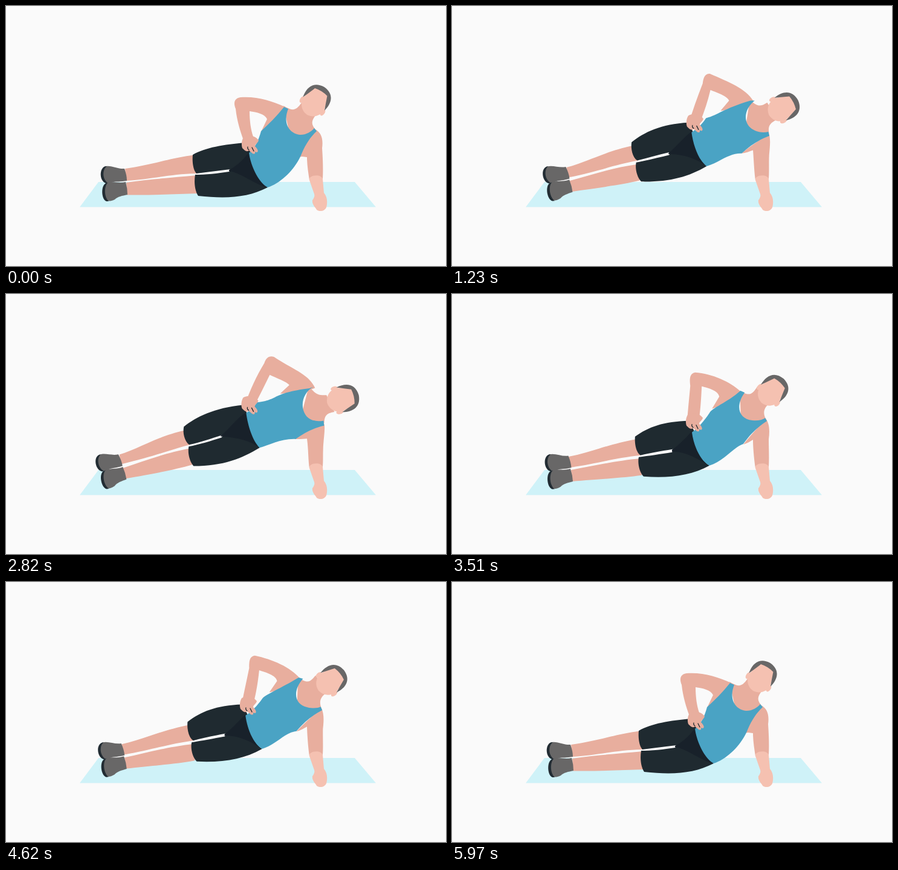
Animation, 728 px wide and 430 px high, one loop 6000 ms. Source, as an HTML page:

```html
<!DOCTYPE html>
<html lang="en">
<head>
<meta charset="utf-8">
<title>Side plank hip lift</title>
<style>
  html, body { margin: 0; width: 100%; height: 100%; overflow: hidden; background: #fafafa; }
  svg { display: block; width: 100vw; height: 100vh; }
</style>
</head>
<body>
<svg id="stage" viewBox="0 0 728 430" xmlns="http://www.w3.org/2000/svg">
  <path fill="#cff2f8" d="M153,291H577L612,332.5H122Z"/>
</svg>
<script>
const SVG = 'http://www.w3.org/2000/svg';
const stage = document.getElementById('stage');
const COLOR = {
  skin: '#e8ae9e', light: '#f5c1b1', shirt: '#4aa3c4',
  shorts: '#1f2a30', shade: '#18212a', grey: '#686767', sole: '#222c33'
};
const LOOP = 6000, STEP = 30, PEAK = 1.05, MID = 0.45;
const movers = [];

function add(parent, tag, attrs) {
  const node = document.createElementNS(SVG, tag);
  for (const key in attrs) node.setAttribute(key, attrs[key]);
  return parent.appendChild(node);
}

// Quadratic through the lowered, middle and raised values.
function mix(values, u) {
  const mid = u * (u - 1) / (MID * (MID - 1));
  const high = u * (u - MID) / (1 - MID);
  return values[0] * (1 - mid - high) + values[1] * mid + values[2] * high;
}

// A path that bends between three poses of the same structure.
function limb(fill, ...poses) {
  const node = add(stage, 'path', { fill });
  const numbers = poses.map(d => d.match(/-?[\d.]+/g).map(Number));
  movers.push(u => {
    let i = 0;
    node.setAttribute('d', poses[0].replace(/-?[\d.]+/g, () => {
      const value = mix(numbers.map(list => list[i]), u);
      i++;
      return value.toFixed(2);
    }));
  });
}

// A rigid group; each pose is [x, y, angle].
function rigid(poses, shapes) {
  const group = add(stage, 'g', {});
  shapes.forEach(([tag, attrs]) => add(group, tag, attrs));
  movers.push(u => {
    const [x, y, angle] = [0, 1, 2].map(k => mix(poses.map(p => p[k]), u).toFixed(2));
    group.setAttribute('transform', `translate(${x} ${y}) rotate(${angle})`);
  });
}

const shape = (fill, d) => ['path', { fill, d }];

// Upper leg
limb(COLOR.skin,
  'M197,269C240,263 265,253 313,246L315,277C270,278 245,286 199,289Z',
  'M193,269C230,262 260,248 306,240L312,267C265,272 240,281 196,287Z',
  'M188,266C225,255 250,237 297,227L305,251C270,259 245,270 191,282Z');
rigid([[198, 280, 0], [195, 278.5, -3], [190, 276, -8]], [
  shape(COLOR.grey, 'M-33,-15C-23,-17 -13,-10 -2,-11Q2,0 2,9C-8,11 -16,10 -20,11C-26,13 -30,13 -34,12C-41,7 -42,-12 -33,-15Z'),
  shape(COLOR.sole, 'M-33,-15C-44,-13 -44,9 -33,13L-29,13C-39,7 -39,-10 -31,-15Z')
]);
limb(COLOR.shorts,
  'M309,246C330,234 360,229 397,226L425,275L371,270C352,272 333,275 315,277C309,270 308,256 309,246Z',
  'M303,236C325,220 350,211 392,210L418,260L365,257C345,260 328,263 312,267C304,262 302,246 303,236Z',
  'M295,221C315,205 345,190 392,186L415,235L357,236C340,241 322,247 304,251C296,245 293,231 295,221Z');

// Lower leg
limb(COLOR.skin,
  'M199,292C240,286 275,284 316,280L318,310C280,311 250,313 200,312.5Z',
  'M197,291C235,284 265,277 313,272L314,300C285,304 250,306 198,310Z',
  'M194,288C230,277 260,265 306,257L309,284C280,292 250,297 197,306Z');
rigid([[200, 302, 0], [198.5, 300, -3], [197, 297, -8]], [
  shape(COLOR.grey, 'M-34,-9C-25,-13 -13,-8 -2,-11Q1,0 1,10C-8,12 -15,13 -20,18C-26,21 -30,21 -34,20C-41,13 -41,-6 -34,-9Z'),
  shape(COLOR.sole, 'M-34,-9C-43,-7 -43,17 -34,21L-30,21C-38,14 -38,-5 -31,-10Z')
]);
limb(COLOR.shorts,
  'M313,279C330,279 350,277 369,274L400,243C410,270 418,290 433,300C400,317 365,319 318,314C312,305 311,290 313,279Z',
  'M309,270C325,268 345,265 364,262L396,228C402,255 410,275 426,284C395,301 360,305 317,302C310,295 307,280 309,270Z',
  'M303,254C320,251 340,245 357,240L397,199C403,225 410,245 420,257C390,275 360,286 311,286C304,278 301,264 303,254Z');
limb(COLOR.shade,
  'M369,271C385,263 394,252 402,242C410,265 418,290 433,300C412,296 390,276 369,273Z',
  'M364,258C378,248 388,237 397,227C402,250 410,275 426,284C405,272 385,260 364,261Z',
  'M356,237C372,224 382,208 397,199C403,225 410,245 420,257C400,242 375,239 356,238Z');

// Arm on hip
limb(COLOR.skin,
  'M462,167C440,157 415,149 388,151C376,153 377,162 380,170C382,190 388,208 393,222L409,216C405,205 403,190 403,174C415,176 428,178 432,187L422,208L448,190Z',
  'M478,162C460,145 430,132 402,130C392,132 393,142 394,152C392,175 390,195 389,212L409,206C411,190 412,175 413,153C425,156 440,160 442,170L430,190L460,180Z',
  'M508,156C497,133 470,125 439,106C430,104 426,110 424,118C412,140 402,163 394,187L413,182C420,168 428,150 434,135C445,140 462,146 466,152L451,167L485,165Z');

// Chest and neck
limb(COLOR.skin,
  'M459,165C472,172 478,176 489,160L513,180C503,192 506,197 514,207L500,225L470,215Z',
  'M476,160C490,168 495,169 505,153L526,180C513,190 515,200 520,208L505,222L478,210Z',
  'M499,153C511,167 515,167 528,165L542,193C527,196 526,203 526,213L512,220L488,200Z');

// Supporting arm
limb(COLOR.skin,
  'M512,204C522,210 525,220 523,235C524,250 525,270 524,286L502,288C500,275 498,262 498,250C494,250 490,248 486,250C492,235 500,218 512,204Z',
  'M519,206C525,214 526,225 524,240C524,255 525,272 524,286L502,288C500,275 498,255 498,241C493,244 488,247 482,249C492,236 505,222 519,206Z',
  'M526,214C528,222 526,235 525,248C524,262 525,275 524,286L502,288C500,275 500,255 498,239C492,240 485,241 478,241C490,232 505,224 526,214Z');

// Shirt
limb(COLOR.shirt,
  'M460,167L467,170C457,195 470,212 487,213C497,213 505,208 510,202L514,207C502,218 494,232 488,247C478,270 455,293 433,300C418,292 405,265 402,243C412,235 418,222 422,207C435,195 448,182 460,167Z',
  'M477,160L484,163C468,185 474,207 497,209C507,210 514,208 518,205L521,210C507,219 494,231 482,248C465,254 450,277 426,284C411,276 400,252 397,229C407,222 416,212 426,197C430,188 455,180 477,160Z',
  'M500,156L507,154C488,165 484,190 498,203C506,210 516,211 525,209L526,217C510,221 495,229 479,241C455,240 437,253 420,257C408,246 400,222 397,200C405,195 412,190 416,181C450,176 440,166 500,156Z');

// Hand on hip
rigid([[0, 0, 0], [-3, -17, 0], [-1, -43, 0]], [
  shape(COLOR.skin, 'M393,217C400,213 411,213 418,222C417,227 412,228 412,232C417,237 418,241 415,242L412,241Q413,246 408,244L402,239C398,242 395,239 391,235C389,229 390,222 393,217Z'),
  ['path', { fill: 'none', stroke: COLOR.shorts, 'stroke-width': 1.3, 'stroke-linecap': 'round',
    d: 'M400,233Q399,236 402,238M407,234L410,240' }]
]);

add(stage, 'path', { fill: COLOR.light,
  d: 'M502,288C500,279 522,277 524,286L526,309C532,316 532,326 530,333C528,339 519,341 514,337C511,332 506,328 507,321C510,317 511,314 510,311Z' });

// Head
rigid([[507.5, 164.5, 32], [524, 166.5, 43], [546.5, 174.5, 73]], [
  ['ellipse', { cx: -20, cy: 1, rx: 3.5, ry: 6, fill: COLOR.light }],
  ['ellipse', { cx: 20, cy: 1, rx: 3.5, ry: 6, fill: COLOR.light }],
  shape(COLOR.light, 'M-20,-4L-14,-28H13L20,-4C20,8 12,17 0,18C-12,17 -20,8 -20,-4Z'),
  shape(COLOR.grey, 'M-21,-3C-25,-20 -20,-35 0,-36C20,-35 25,-20 21,-3L17,-13L12,-26Q0,-29 -12,-26L-17,-13Z')
]);

// Each repetition: rise start, rise end, fall start, fall end.
const REPS = [
  [60, 740, 1010, 1810],
  [1985, 2785, 3075, 3875],
  [4165, 4965, 5148, 5948]
];

function ramp(t, from, to) {
  const x = Math.min(1, Math.max(0, (t - from) / (to - from)));
  return x * x * (3 - 2 * x);
}

function draw(t) {
  const lift = REPS.reduce((sum, [a, b, c, d]) => sum + ramp(t, a, b) - ramp(t, c, d), 0);
  movers.forEach(move => move(lift * PEAK));
}

const start = performance.now();
function tick(now) {
  const t = Math.max(0, now - start) % LOOP;
  draw(Math.floor(t / STEP) * STEP);
  requestAnimationFrame(tick);
}
draw(0);
requestAnimationFrame(tick);
</script>
</body>
</html>
```
